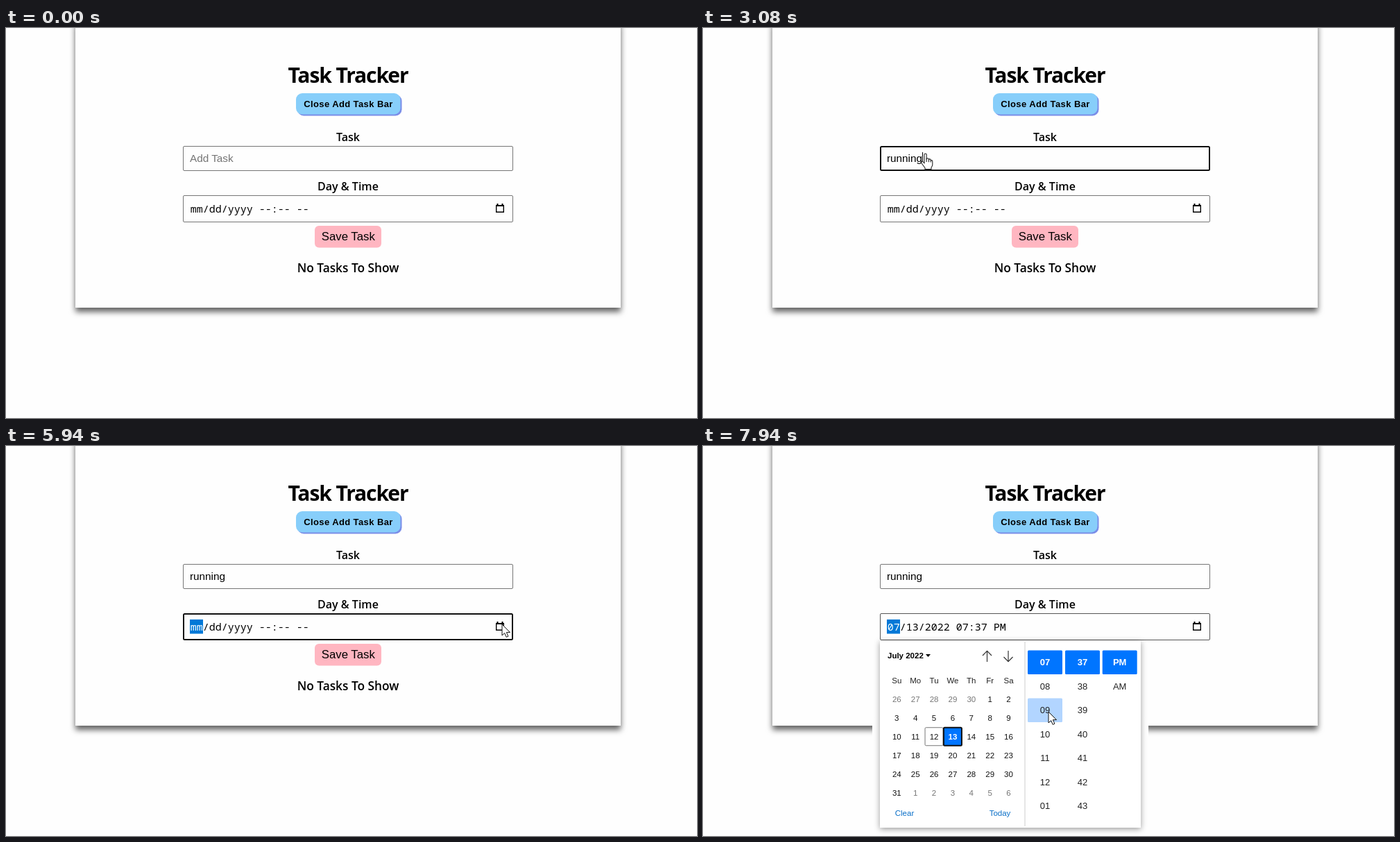
An HTML page that plays this animation: 996x562 px, repeating every 8 s.

```html
<!DOCTYPE html>
<html lang="en">
<head>
<meta charset="utf-8">
<title>Task Tracker</title>
<style>
  html, body { margin: 0; width: 100%; height: 100%; overflow: hidden; background: #fefefe; }
  svg { display: block; width: 100%; height: 100%; }
  .ui { font-family: "Open Sans", "Noto Sans", sans-serif; font-weight: 600; }
  .menu { font-family: "Open Sans", "Noto Sans", sans-serif; font-size: 12px; fill: #444; }
  .arial { font-family: "Liberation Sans", Arial, sans-serif; }
  .mono { font-family: "Noto Sans Mono", "DejaVu Sans Mono", monospace; font-size: 15px; white-space: pre; }
  .mid { text-anchor: middle; }
  .bold { font-weight: 700; }
  .day { font-size: 11.5px; }
  .slot { font-size: 13px; }
  .card { filter: drop-shadow(0 6px 4.5px rgba(0, 0, 0, .62)); }
  .popup { filter: drop-shadow(0 2px 4px rgba(0, 0, 0, .4)); }
  .list { filter: drop-shadow(0 1px 1.5px rgba(0, 0, 0, .35)); }
</style>
</head>
<body>
<svg id="stage" viewBox="0 0 996 562"></svg>
<script>
const LOOP = 8000;
const BLUE = '#0075ff', HOVER = '#b2d5ff';
const stage = document.getElementById('stage');

function add(tag, attrs = {}, parent = stage) {
  const el = document.createElementNS('http://www.w3.org/2000/svg', tag);
  for (const key in attrs) el.setAttribute(key, attrs[key]);
  parent.append(el);
  return el;
}
const rect = (x, y, width, height, attrs, parent) =>
  add('rect', { x, y, width, height, ...attrs }, parent);
const path = (d, attrs, parent) => add('path', { d, fill: 'none', ...attrs }, parent);
function text(str, x, y, cls, attrs, parent) {
  const el = add('text', { x, y, class: cls, ...attrs }, parent);
  el.textContent = str;
  return el;
}
const set = (el, key, value) => {
  if (el.getAttribute(key) !== String(value)) el.setAttribute(key, value);
};
const setText = (el, str) => { if (el.textContent !== str) el.textContent = str; };
const show = (el, on) => set(el, 'visibility', on ? 'visible' : 'hidden');

// Page
rect(100, -10, 786, 413, { fill: '#fefefe', class: 'card' });
text('Task Tracker', 493, 79, 'ui mid', { 'font-size': 30, 'letter-spacing': -0.5, style: 'font-weight:700' })
  .setAttribute('letter-spacing', -1.1);
rect(420, 96, 150.5, 30.5, { rx: 9, fill: '#7b8ee8' });
rect(418, 94, 150.5, 30.5, { rx: 9, fill: '#87cefa' });
text('Close Add Task Bar', 493.5, 114, 'arial bold mid', { 'font-size': 13, 'letter-spacing': 0.4 });
text('Task', 493, 163, 'ui mid', { 'font-size': 16 });
text('Day & Time', 493, 234, 'ui mid', { 'font-size': 16 });
rect(445, 285, 96, 31.5, { rx: 6, fill: '#ffb6c1' });
text('Save Task', 493.3, 306, 'arial mid', { 'font-size': 16.8 });
text('No Tasks To Show', 493, 352, 'ui mid', { 'font-size': 17.3 });

// Fields
function field(y, h) {
  const box = add('rect', { fill: '#fefefe', rx: 1.5 });
  return (focused, color = '#767676') => {
    const w = focused ? 2 : 1, i = w / 2;
    const attrs = { x: 255 + i, y: y + i, width: 476 - w, height: h - w,
      stroke: focused ? '#101010' : color, 'stroke-width': w };
    for (const key in attrs) set(box, key, attrs[key]);
  };
}
const taskBorder = field(170, 36), dateBorder = field(241, 39);
const taskText = text('', 265, 193, 'arial', { 'font-size': 15.3 });
const caret = rect(265, 179, 1, 17, { fill: '#000' });
const monthMark = rect(265, 250, 19, 20.5, { fill: '#0078d7' });
const month = text('', 265.7, 266, 'mono');
const restOfDate = text('', 283.7, 266, 'mono');
path('M706.7 256H717.3V265.3H706.7Z', { stroke: '#000', 'stroke-width': 1.4 });
path('M706 256H718M708.5 253V256M715.5 253V256', { stroke: '#000', 'stroke-width': 2 });

// Suggestion lists
function suggestions(words, width, height) {
  const g = add('g', { class: 'list' });
  rect(350, 214, width, height, { rx: 3, fill: '#fff' }, g);
  path('M364 214.5L371 207.5L378 214.5Z', { fill: '#fff' }, g);
  words.forEach((word, i) => text(word, 362, 241 + 34.4 * i, 'menu', {}, g));
  return g;
}
const allWords = suggestions(['a', 'k', 'j', 'aa', 'h', 's'], 46.5, 216);
const oneWord = suggestions(['running'], 79, 44.5);

// Calendar popup
const popup = add('g');
rect(244, 390, 398, 36, { rx: 8, fill: '#fefefe' }, popup);
rect(255, 280.5, 376, 269.5, { fill: '#fff', class: 'popup' }, popup);
path('M464 282V548', { stroke: '#ccc' }, popup);
text('July 2022', 266, 306, 'arial bold day', {}, popup);
path('M321 300H328L324.5 304Z', { fill: '#000' }, popup);
path('M409.5 311V295.5M403 302L409.5 295.3L416 302M440 295V310.5M433.5 304L440 310.7L446.5 304',
  { stroke: '#333', 'stroke-width': 1.2 }, popup);
text('Clear', 290.5, 533, 'arial day mid', { fill: '#0b70c8' }, popup);
text('Today', 428, 533, 'arial day mid', { fill: '#0b70c8' }, popup);

const cells = [];
function cell(label, cx, cy, w, h, cls, color) {
  const box = rect(cx - w / 2, cy - h / 2, w, h, { rx: 1.5 }, popup);
  const el = text(label, cx, cy + (cls === 'day' ? 4.2 : 4.6), `arial mid ${cls}`, {}, popup);
  const item = { box, el, color, cls, label,
    has: (x, y) => Math.abs(x - cx) < w / 2 && Math.abs(y - cy) < h / 2 };
  cells.push(item);
  return item;
}
const columnX = i => 279.3 + 26.87 * i;
['Su', 'Mo', 'Tu', 'We', 'Th', 'Fr', 'Sa'].forEach((name, i) =>
  text(name, columnX(i), 341.5, 'arial day mid', { fill: '#222' }, popup));
const days = [];
for (let i = 0; i < 42; i++) {
  const d = i - 4, inMonth = d > 0 && d < 32;
  const label = d < 1 ? d + 30 : d > 31 ? d - 31 : d;
  const item = cell(label, columnX(i % 7), 365 + 26.87 * Math.floor(i / 7), 26, 26,
    'day', inMonth ? '#111' : '#757575');
  if (inMonth) days[d] = item;
}
const twoDigits = n => String(n).padStart(2, '0');
function slots(labels, cx) {
  return labels.map((label, i) => cell(label, cx, 311.7 + 34.5 * i, 50, 34.5, 'slot', '#222'))[0];
}
const now = [
  slots([7, 8, 9, 10, 11, 12, 1].map(twoDigits), 493),
  slots([37, 38, 39, 40, 41, 42, 43].map(twoDigits), 547),
  slots(['PM', 'AM'], 600.7)
];

// Pointer
const click = add('circle', { r: 13, fill: '#ffee00', 'fill-opacity': 0.6 });
const pointer = add('g');
const arrow = path('M0 0V16L3.7 12.6L6.2 18.4L8.9 17.2L6.4 11.6H11.5Z',
  { fill: '#fff', stroke: '#111' }, pointer);
const hand = add('g', { stroke: '#222', 'stroke-width': 1.1, 'stroke-linejoin': 'round' }, pointer);
path('M-2 14V1.8Q-2 0 -.4 0Q1.2 0 1.2 1.8V8Q1.5 6.6 3 6.8Q4.4 7 4.4 8.6Q4.8 7.6 6 7.9Q7.2 8.2 7.3 9.8' +
  'Q9.6 9 9.8 11.5V16Q9.8 18 8 20V22.5H-1V20.5Q-3 18 -5.5 14.5Q-7 12 -5.2 11.3Q-4 11 -2 14Z', { fill: '#fff' }, hand);
path('M1.2 7V12M4.4 8.6V12.2M7.3 9.8V12.6', {}, hand);

// Each move: start, end, steps, then waypoints [share of the steps, x, y]
const moves = [
  [260, 660, 7, [0, 430, 352], [1, 321, 181]],
  [3410, 4100, 11, [0, 321, 181], [0.5, 520, 224], [0.85, 700, 262], [1, 723, 258]],
  [4710, 5460, 12, [0, 723, 258], [0.15, 742, 264], [0.5, 500, 304], [0.6, 495, 304], [0.9, 742, 260], [1, 733, 258]],
  [5520, 5730, 4, [0, 733, 258], [1, 715, 257]],
  [6280, 7080, 12, [0, 715, 257], [5 / 12, 413, 411], [0.6, 400, 419], [1, 361, 413]],
  [7470, 7940, 8, [0, 361, 413], [0.65, 540, 375], [1, 498, 383]]
];
function pointerAt(t) {
  const move = moves.filter(m => t >= m[0]).pop();
  if (!move) return null;
  const [start, end, steps, ...points] = move;
  const k = Math.min(1, (t - start) / (end - start));
  const p = (Math.floor(k * (steps - 1) + 1e-6) + 1) / steps;
  const i = Math.max(1, points.findIndex(q => q[0] >= p - 1e-6));
  const [a, b] = [points[i - 1], points[i]];
  const f = (p - a[0]) / (b[0] - a[0]);
  return [a[1] + (b[1] - a[1]) * f, a[2] + (b[2] - a[2]) * f];
}

const WORD = 'running', KEYS = [1680, 1820, 2080, 2220, 2480, 2750, 2880];
const FOCUS = 800, DATE_FOCUS = 4240, OPEN = 6000, PICK = 7200;
const CLICKS = [[800, 880], [4240, 4370], [5870, 5940]];
const within = (v, a, b) => v >= a && v < b;

function drawFields(t) {
  const typed = WORD.slice(0, KEYS.filter(k => t >= k).length);
  const focused = within(t, FOCUS, DATE_FOCUS);
  taskBorder(focused);
  dateBorder(within(t, DATE_FOCUS, OPEN), t >= OPEN ? '#555' : '#767676');
  setText(taskText, typed || 'Add Task');
  set(taskText, 'fill', typed ? '#000' : '#757575');
  const anchor = t >= KEYS[6] ? 2940 : KEYS.filter(k => t >= k).pop() || 880;
  show(caret, focused && (t < anchor || (t - anchor) % 1000 < 500));
  set(caret, 'x', typed ? 265 + taskText.getComputedTextLength() : 265);

  const marked = t >= DATE_FOCUS, picked = t >= PICK;
  show(monthMark, marked);
  setText(month, picked ? '07' : 'mm');
  set(month, 'fill', marked ? '#fff' : '#000');
  setText(restOfDate, picked ? '/13/2022 07:37 PM' : '/dd/yyyy --:-- --');

  show(allWords, within(t, 880, KEYS[0]));
  show(oneWord, within(t, KEYS[0], 3080));
  set(oneWord, 'opacity', t < 2940 ? 1 : t < 3010 ? 0.6 : 0.25);
}

function drawCalendar(t, at) {
  show(popup, t >= OPEN);
  if (t < OPEN) return;
  const chosen = days[t >= PICK ? 13 : 12];
  for (const item of cells) {
    const selected = item === chosen || now.includes(item);
    const hovered = at && item.has(...at);
    set(item.box, 'fill', selected ? BLUE : hovered ? HOVER : 'none');
    set(item.box, 'stroke', item === chosen ? '#101010' : item === days[12] ? '#767676' : 'none');
    set(item.box, 'stroke-width', item === chosen ? 2 : 1);
    set(item.el, 'fill', selected ? '#fff' : item.color);
    set(item.el, 'class', `arial mid ${item.cls}${selected ? ' bold' : ''}`);
  }
}

function drawPointer(t, at) {
  show(pointer, at);
  show(click, at && CLICKS.some(c => within(t, ...c)));
  if (!at) {
    show(arrow, false);
    show(hand, false);
    return;
  }
  const [x, y] = at;
  const inField = within(x, 255, 731) && (within(y, 170, 206) || within(y, 241, 280));
  const onIcon = within(x, 704, 720) && within(y, 241, 280);
  const onSave = within(x, 445, 541) && within(y, 285, 316);
  const useHand = t < OPEN && (inField && !onIcon || onSave);
  show(hand, useHand);
  show(arrow, !useHand);
  set(pointer, 'transform', `translate(${x} ${y})`);
  set(click, 'cx', x);
  set(click, 'cy', y + 2);
}

function frame() {
  const t = performance.now() % LOOP;
  const at = pointerAt(t);
  drawFields(t);
  drawCalendar(t, at);
  drawPointer(t, at);
  requestAnimationFrame(frame);
}
frame();
</script>
</body>
</html>
```
